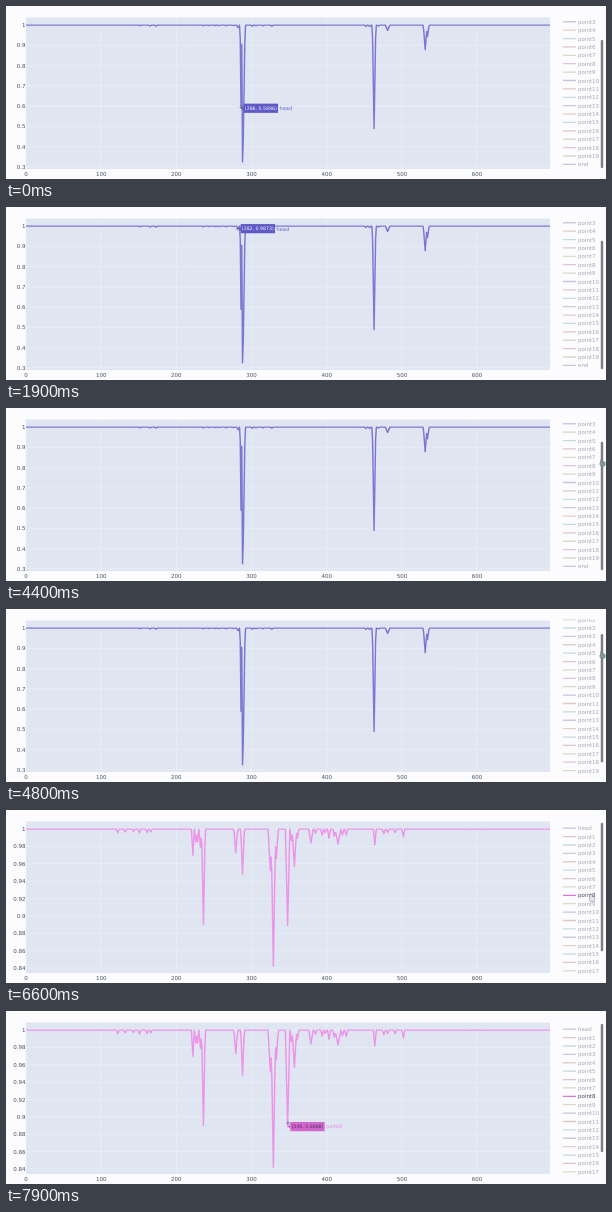
These frames come from a looping animation (600 px wide and 173 px high, 8 s). An HTML page with a canvas:

```html
<!DOCTYPE html>
<html lang="en">
<head>
<meta charset="utf-8">
<title>Likelihood chart</title>
<style>
html, body { margin: 0; width: 600px; height: 173px; overflow: hidden; background: #fcfbfd; }
canvas { display: block; width: 600px; height: 173px; }
</style>
</head>
<body>
<canvas id="stage"></canvas>
<script>
const LOOP = 8000;
const W = 600, H = 173;
const BOX = { l: 20, t: 11.5, r: 544, b: 163 };
const FONT = '"DejaVu Sans", sans-serif';
const INK = '#4c5466', GRID = '#eaeff7';
const HUES = [243, 9, 163, 269, 28, 190, 345, 83, 304, 43];
const ROW = 8.39, FIRST_ROW = 18.2, SCROLL = 27.6, THUMB_TRAVEL = 21;
const HEAD_OFF = 5800, POINT_ON = 6430;

const canvas = document.getElementById('stage');
const ratio = window.devicePixelRatio || 1;
canvas.width = W * ratio;
canvas.height = H * ratio;
const ctx = canvas.getContext('2d');

const names = ['head', ...Array.from({ length: 19 }, (_, i) => 'point' + (i + 1)), 'end'];

function random(seed) {
  return () => (seed = (seed * 16807) % 2147483647) / 2147483647;
}

// A dip is [position, depth, half width]; a cluster is [from, to, count, depth].
function makeData(dips, clusters, seed) {
  const rnd = random(seed);
  const all = [...dips];
  for (const [from, to, count, depth] of clusters) {
    for (let i = 0; i < count; i++) {
      const x = from + (to - from) * (i + 0.2 + 0.6 * rnd()) / count;
      all.push([Math.round(x), depth * (0.35 + 0.65 * rnd()), 2]);
    }
  }
  return Array.from({ length: 698 }, (_, x) =>
    1 - Math.max(0, ...all.map(([c, d, w]) => d * (1 - Math.abs(x - c) / w))));
}

const head = {
  index: 0, color: '#6a64cd', tip: '#5e59c4', tipInk: '#f5f4ff',
  step: 0.1, low: 0.3, scale: 202.6,
  data: makeData([
    [282, 0.0127, 2], [286, 0.4104, 1.2], [287, 0.09, 1], [288, 0.675, 1], [289, 0.57, 2.4],
    [463, 0.51, 2.3], [481, 0.026, 3], [531, 0.121, 2.5], [534, 0.057, 2.2]
  ], [[150, 175, 3, 0.005], [230, 280, 6, 0.004], [295, 330, 4, 0.007], [445, 475, 3, 0.008]], 41)
};
const point8 = {
  index: 8, color: '#ee86e7', tip: '#d467cf', tipInk: '#53345f',
  step: 0.02, low: 0.84, scale: 868,
  data: makeData([
    [222, 0.03, 2], [236, 0.11, 2.4], [279, 0.027, 2.5], [288, 0.052, 2.4],
    [325, 0.048, 3], [329, 0.158, 3], [333, 0.034, 2.5], [348, 0.1112, 3],
    [357, 0.043, 3], [379, 0.016, 3], [415, 0.017, 4], [464, 0.018, 2]
  ], [[120, 172, 6, 0.005], [224, 234, 3, 0.025], [352, 364, 3, 0.02],
    [384, 430, 8, 0.011], [468, 508, 4, 0.01], [580, 620, 2, 0.001]], 97)
};

// Pointer stops: [time, x, y]
const stops = [
  [400, 235.5, 101], [950, 231.8, 21.8], [1900, 231.8, 21.8], [2550, 568, 62],
  [3050, 568, 62], [3600, 596.5, 54.5], [4600, 596.5, 54.5], [5050, 596.5, 33.5],
  [5400, 580, 22], [5850, 580, 22], [6150, 586, 88], [6700, 586, 88], [7600, 282, 112]
];

const ease = p => p * p * (3 - 2 * p);
const span = (t, a, b) => ease(Math.min(1, Math.max(0, (t - a) / (b - a))));
const px = x => BOX.l + x * 0.7518;
const py = (trace, v) => 19.1 + (1 - v) * trace.scale;

function pointer(t) {
  let i = 0;
  while (i < stops.length - 2 && t >= stops[i + 1][0]) i++;
  const [ta, xa, ya] = stops[i], [tb, xb, yb] = stops[i + 1];
  const p = span(t, ta, tb);
  return { x: xa + (xb - xa) * p, y: ya + (yb - ya) * p };
}

function text(str, x, y, size, color, align = 'left') {
  ctx.font = `${size}px ${FONT}`;
  ctx.fillStyle = color;
  ctx.textAlign = align;
  ctx.fillText(str, x, y + size * 0.37);
}

function line(x1, y1, x2, y2, color, width) {
  ctx.strokeStyle = color;
  ctx.lineWidth = width;
  ctx.beginPath();
  ctx.moveTo(x1, y1);
  ctx.lineTo(x2, y2);
  ctx.stroke();
}

function drawAxes(trace) {
  ctx.fillStyle = '#dfe6f2';
  ctx.fillRect(BOX.l, BOX.t, BOX.r - BOX.l, BOX.b - BOX.t);
  for (let x = 0; x <= 600; x += 100) {
    line(px(x), BOX.t, px(x), BOX.b, GRID, 0.7);
    text(x, px(x), 167.6, 5.5, INK, 'center');
  }
  const rows = Math.round((1 - trace.low) / trace.step);
  for (let i = 0; i <= rows; i++) {
    const v = 1 - i * trace.step, y = py(trace, v);
    line(BOX.l, y, BOX.r, y, GRID, 0.7);
    text(+v.toFixed(2), 19.5, y, 5.5, INK, 'right');
  }
}

function drawTrace(trace) {
  ctx.strokeStyle = trace.color;
  ctx.globalAlpha = 0.85;
  ctx.lineWidth = 1.45;
  ctx.lineJoin = 'round';
  ctx.beginPath();
  trace.data.forEach((v, x) => ctx.lineTo(px(x), py(trace, v)));
  ctx.stroke();
  ctx.globalAlpha = 1;
}

function drawLegend(active, scrolled) {
  ctx.save();
  ctx.beginPath();
  ctx.rect(550, 10.5, 44, 154);
  ctx.clip();
  names.forEach((name, i) => {
    const y = FIRST_ROW + i * ROW - SCROLL * scrolled;
    const on = i === active;
    ctx.globalAlpha = on ? 1 : 0.5;
    line(557, y, 570, y, `hsl(${HUES[i % 10]}, ${on ? 55 : 28}%, 66%)`, 1.3);
    text(name, 572, y, 5.5, on ? '#414a62' : '#566074');
  });
  ctx.restore();
  ctx.lineCap = 'round';
  const top = 14 + THUMB_TRAVEL * scrolled;
  line(596, top, 596, top + 126, '#7d7d89', 2.4);
  ctx.lineCap = 'butt';
}

function drawTip(trace, at) {
  let best = 9, hit = -1;
  trace.data.forEach((v, x) => {
    const d = Math.hypot(px(x) - at.x, py(trace, v) - at.y);
    if (d < best) { best = d; hit = x; }
  });
  if (hit < 0) return;
  const v = trace.data[hit], x = px(hit), y = py(trace, v);
  ctx.fillStyle = trace.tip;
  ctx.beginPath();
  ctx.moveTo(x, y);
  ctx.lineTo(x + 2.8, y - 2.2);
  ctx.lineTo(x + 2.8, y + 2.2);
  ctx.fill();
  ctx.fillRect(x + 2.6, y - 4.6, 34.4, 9.2);
  text(`(${hit}, ${v.toFixed(4)})`, x + 19.8, y, 4.7, trace.tipInk, 'center');
  text(names[trace.index], x + 38.6, y, 5, trace.color);
}

function drawPointer(at) {
  if (at.x < BOX.r) {
    line(at.x - 2, at.y, at.x + 2, at.y, '#6f7488', 0.7);
    line(at.x, at.y - 2, at.x, at.y + 2, '#6f7488', 0.7);
    return;
  }
  // Small hand: a finger above a rounded palm
  ctx.fillStyle = at.x > 594 ? '#7d9b8d' : '#e6e6ec';
  ctx.strokeStyle = '#6a6e7a';
  ctx.lineWidth = 0.8;
  ctx.beginPath();
  ctx.roundRect(at.x - 1.7, at.y - 3.6, 1.6, 4, 0.8);
  ctx.roundRect(at.x - 2.4, at.y - 0.9, 5, 4.5, 1.6);
  ctx.stroke();
  ctx.fill();
}

function draw(t) {
  ctx.setTransform(ratio, 0, 0, ratio, 0, 0);
  ctx.fillStyle = '#fcfbfd';
  ctx.fillRect(0, 0, W, H);
  const axes = t < POINT_ON ? head : point8;
  const trace = t >= HEAD_OFF && t < POINT_ON ? null : axes;
  const at = pointer(t);
  drawAxes(axes);
  if (trace) drawTrace(trace);
  drawLegend(trace ? trace.index : -1, 1 - span(t, 4600, 5050));
  if (trace && at.x < BOX.r) drawTip(trace, at);
  drawPointer(at);
}

const start = performance.now();
function tick() {
  draw((performance.now() - start) % LOOP);
  requestAnimationFrame(tick);
}
tick();
</script>
</body>
</html>
```
